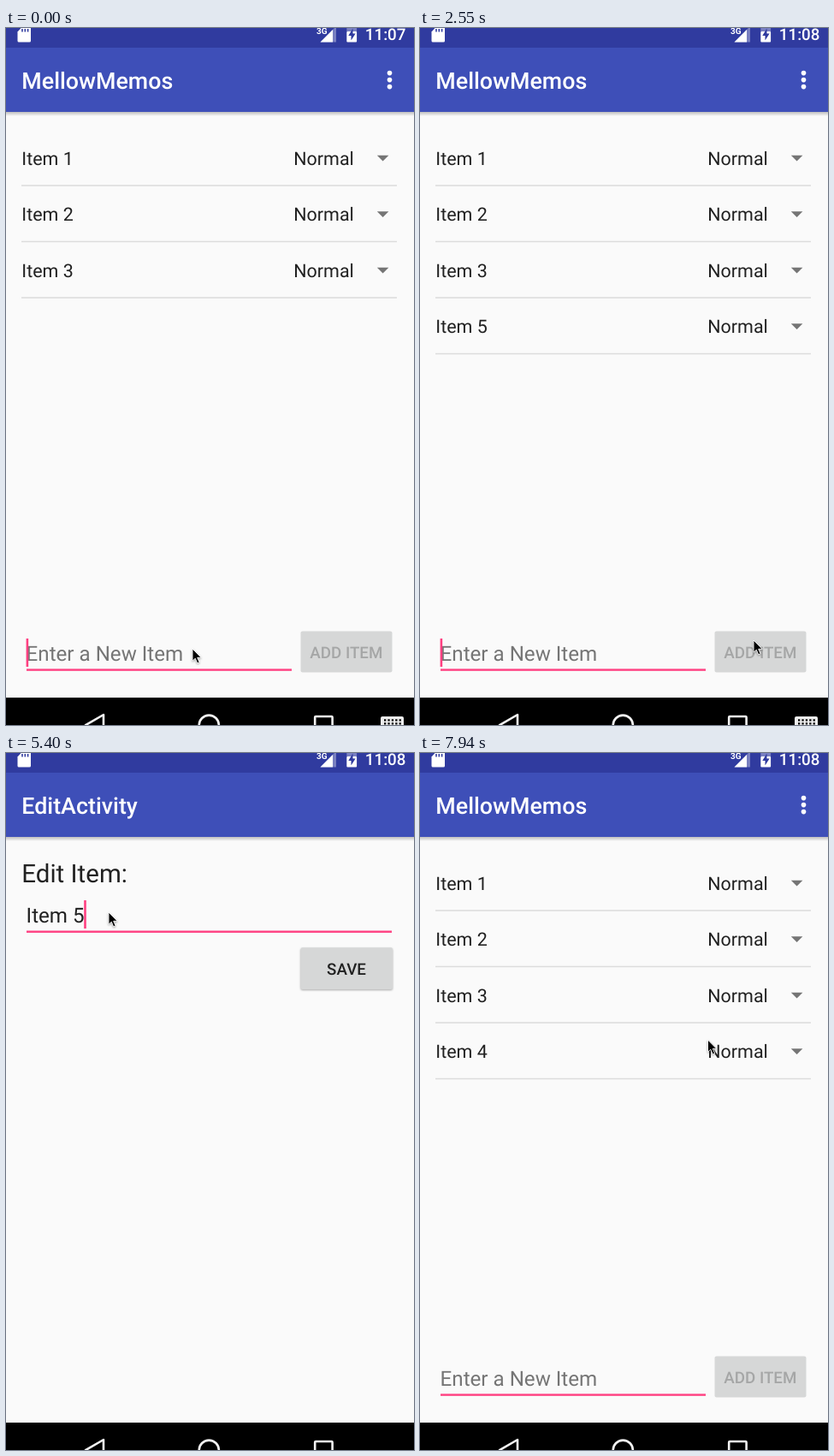
An HTML page that plays this animation: 477 px wide and 814 px high, repeating every 8000 ms.

```html
<!DOCTYPE html>
<html lang="en">
<head>
<meta charset="utf-8">
<title>To-do list demo</title>
<style>
  html, body { margin: 0; width: 100%; height: 100%; overflow: hidden; background: #000; }
  svg { display: block; width: 100%; height: 100%; }
  text { font-family: Roboto, sans-serif; fill: #212121; white-space: pre; text-rendering: geometricPrecision; }
  .title { font-size: 26.8px; font-weight: 500; fill: #fff; }
  .item { font-size: 21.46px; }
  .field { font-size: 24.15px; }
  .hint { fill: #757575; }
  .label { font-size: 29.5px; }
  .button text { font-size: 18.78px; font-weight: 500; text-anchor: middle; }
  .button rect { fill: #d6d7d7; }
  .up rect { filter: drop-shadow(0 1.3px 1px rgba(0, 0, 0, .32)); }
  .down rect { fill: #cbcccc; filter: drop-shadow(0 2px 2.5px rgba(0, 0, 0, .4)); }
  .off text { fill: #a5a6a6; }
  .pink { fill: #ff4081; }
  .clock { font-size: 18.78px; font-weight: 500; fill: #fff; }
  .net { font-size: 10px; font-weight: 700; fill: #fff; }
  .nav { fill: none; stroke: #f2f2f2; stroke-width: 2.6; stroke-linejoin: round; }
  #pointer { filter: drop-shadow(0 1px 1px rgba(0, 0, 0, .35)); }
</style>
</head>
<body>
<svg viewBox="0 0 477 814">
  <defs>
    <linearGradient id="fade" x2="0" y2="1">
      <stop stop-opacity=".24"/>
      <stop offset="1" stop-opacity="0"/>
    </linearGradient>
    <g id="frame">
      <rect width="477" height="782" fill="#fafafa"/>
      <rect width="477" height="23" fill="#303b9f"/>
      <rect y="23" width="477" height="75" fill="#3e4fb8"/>
      <rect y="98" width="477" height="5" fill="url(#fade)"/>
    </g>
  </defs>

  <rect width="477" height="814"/>

  <g id="main">
    <use href="#frame"/>
    <text class="title" x="18.3" y="71">MellowMemos</text>
    <g fill="#fff">
      <circle cx="448.5" cy="52.6" r="2.8"/>
      <circle cx="448.5" cy="60.6" r="2.8"/>
      <circle cx="448.5" cy="68.6" r="2.8"/>
    </g>
    <rect id="press" x="18" y="316" width="439" height="64" opacity=".07"/>
    <g id="rows"></g>
    <text id="hint" class="field hint" x="23.6" y="739">Enter a New Item</text>
    <text id="entry" class="field" x="23.6" y="739"></text>
    <rect class="pink" x="24" y="748.4" width="310" height="2.4"/>
    <rect id="mainCaret" class="pink" y="713" width="2.6" height="33"/>
    <g id="add" class="button">
      <rect x="344.5" y="704.5" width="107" height="48" rx="2"/>
      <text x="397.8" y="736">ADD ITEM</text>
    </g>
    <rect id="dim" width="477" height="782"/>
  </g>

  <g id="edit">
    <use href="#frame"/>
    <text class="title" x="18.3" y="71">EditActivity</text>
    <text class="label" x="18.3" y="151">Edit Item:</text>
    <text id="name" class="field" x="23.6" y="198"></text>
    <rect class="pink" x="24" y="207.5" width="427" height="2.4"/>
    <rect id="editCaret" class="pink" x="91.2" y="172" width="2.6" height="33"/>
    <g id="save" class="button">
      <rect x="344.5" y="227.3" width="107.5" height="48.7" rx="2"/>
      <text x="398" y="259">SAVE</text>
    </g>
  </g>

  <rect id="lip" y="783" width="477" height="3.2" fill="#141414"/>

  <g class="nav">
    <path d="M114 802 93 814.2 114 826.4Z"/>
    <circle cx="237.3" cy="814.2" r="11.6"/>
    <rect x="361.2" y="804" width="20.4" height="20.4" rx="1"/>
  </g>
  <g id="keyboard">
    <rect x="438" y="804" width="27" height="18" rx="2" fill="#eee"/>
    <path d="M442 808.3H462M442 812.3H462" stroke="#000" stroke-width="2.2" stroke-dasharray="2.3 2.1"/>
  </g>

  <g fill="#fff">
    <path d="M18.5 -1H27.5Q29 -1 29 .5V15Q29 16.5 27.5 16.5H15Q13.5 16.5 13.5 15V4.5Z"/>
    <path d="M19 1V4.5M22.3 1V4.5M25.6 1V4.5" stroke="#303b9f" stroke-width="1.6"/>
    <text class="net" x="363" y="6.5">3G</text>
    <path d="M386 -2V16.5H367.5Z" opacity=".35"/>
    <path d="M382 2V16.5H367.5Z"/>
    <rect x="398.3" y="-1" width="11.8" height="5" opacity=".35"/>
    <rect x="398.3" y="4" width="11.8" height="12.5" rx="1"/>
    <path d="M405.5 .5 400.3 9H403.5V14.5L408.6 6.6H405.5Z" fill="#303b9f"/>
    <text id="clock" class="clock" x="419.8" y="14.2"></text>
  </g>

  <path id="pointer" d="M0 0V14.2L3.3 11.2 5.7 16.8 8.1 15.7 5.7 10.3H10.2Z" stroke="#fff" stroke-width=".9"/>
</svg>

<script>
const LOOP = 8000;
const $ = id => document.getElementById(id);

// Each step changes only the listed parts of the state.
const steps = [
  [0, { clock: '11:07', entry: '', row: '', caret: 1, add: 'off', keyboard: 1, at: [218, 725],
        press: 0, alpha: 0, shift: 0, dim: 0, lip: 0, name: 'Item 5', editCaret: 1, save: 'up' }],
  [600, { entry: 'I', add: 'up', at: null }],
  [750, { entry: 'Ite', clock: '11:08' }],
  [900, { entry: 'Item' }],
  [1050, { entry: 'Item ' }],
  [1200, { entry: 'Item 5' }],
  [1500, { at: [336, 752] }],
  [1650, { at: [384, 758], caret: 0 }],
  [1800, { at: [394, 742] }],
  [1950, { at: [397, 735] }],
  [2100, { add: 'down', caret: 1 }],
  [2250, { entry: '', row: 'Item 5' }],
  [2400, { at: [397, 734] }],
  [2550, { add: 'off', at: [390, 715] }],
  [2700, { at: [342, 620], caret: 0 }],
  [2850, { at: [246, 470] }],
  [3000, { at: [164, 345] }],
  [3150, { at: [128, 308], caret: 1 }],
  [3300, { at: [110, 334] }],
  [3450, { at: [105, 353] }],
  [3600, { at: [97.5, 352.5] }],
  [4050, { at: [98, 351.5], caret: 0 }],
  [4350, { press: 1 }],
  [4500, { press: 0, alpha: 1, shift: 4, lip: 1, keyboard: 0 }],
  [4650, { shift: 0, lip: 0, at: [103, 318] }],
  [4800, { at: [113, 238] }],
  [4950, { at: [120, 186], editCaret: 0 }],
  [5400, { editCaret: 1 }],
  [5690, { name: 'Item 4' }],
  [5990, { at: [459, 156] }],
  [6290, { at: [428, 205], editCaret: 0 }],
  [6440, { at: [396, 240] }],
  [6590, { at: [386, 249] }],
  [6740, { at: [389, 250], editCaret: 1 }],
  [6890, { at: [391.5, 250] }],
  [7190, { save: 'down', row: 'Item 4' }],
  [7340, { alpha: .35, shift: 25, dim: .045 }],
  [7490, { alpha: 0, shift: 0, dim: 0 }],
  [7790, { at: [366, 290] }],
  [7940, { at: [336.5, 335] }]
];

const rowMarkup = (label, i) => `
  <g transform="translate(0 ${65.5 * i})">
    <text class="item" x="18.3" y="159.8">${label}</text>
    <text class="item" x="336.3" y="159.8">Normal</text>
    <path d="M433.8 148.8H447.4L440.6 155.6Z" fill="#757575"/>
    <rect x="18" y="183.2" width="439" height="1.5" fill="#dcdcdc"/>
  </g>`;
$('rows').innerHTML = ['Item 1', 'Item 2', 'Item 3', ''].map(rowMarkup).join('');
const lastRow = $('rows').lastElementChild;

const show = (el, on) => el.setAttribute('visibility', on ? 'visible' : 'hidden');
const fade = (el, value) => el.setAttribute('opacity', value);

function draw(s) {
  $('clock').textContent = s.clock;
  $('entry').textContent = s.entry;
  show($('hint'), !s.entry);
  show($('mainCaret'), s.caret);
  $('mainCaret').setAttribute('x', 23.6 + (s.entry ? $('entry').getComputedTextLength() : 0));
  $('add').setAttribute('class', 'button ' + s.add);
  show(lastRow, s.row);
  lastRow.firstElementChild.textContent = s.row;
  show($('press'), s.press);
  fade($('dim'), s.dim);

  show($('edit'), s.alpha);
  fade($('edit'), s.alpha);
  $('edit').setAttribute('transform', `translate(0 ${s.shift})`);
  $('name').textContent = s.name;
  fade($('editCaret'), s.editCaret);
  $('save').setAttribute('class', 'button ' + s.save);

  show($('lip'), s.lip);
  show($('keyboard'), s.keyboard);
  show($('pointer'), s.at);
  if (s.at) $('pointer').setAttribute('transform', `translate(${s.at})`);
}

const start = performance.now();
let shown = -1;

function tick() {
  const t = (performance.now() - start) % LOOP;
  const past = steps.filter(([time]) => time <= t);
  if (past.length !== shown) {
    shown = past.length;
    draw(Object.assign({}, ...past.map(([, change]) => change)));
  }
  requestAnimationFrame(tick);
}
tick();
</script>
</body>
</html>
```
